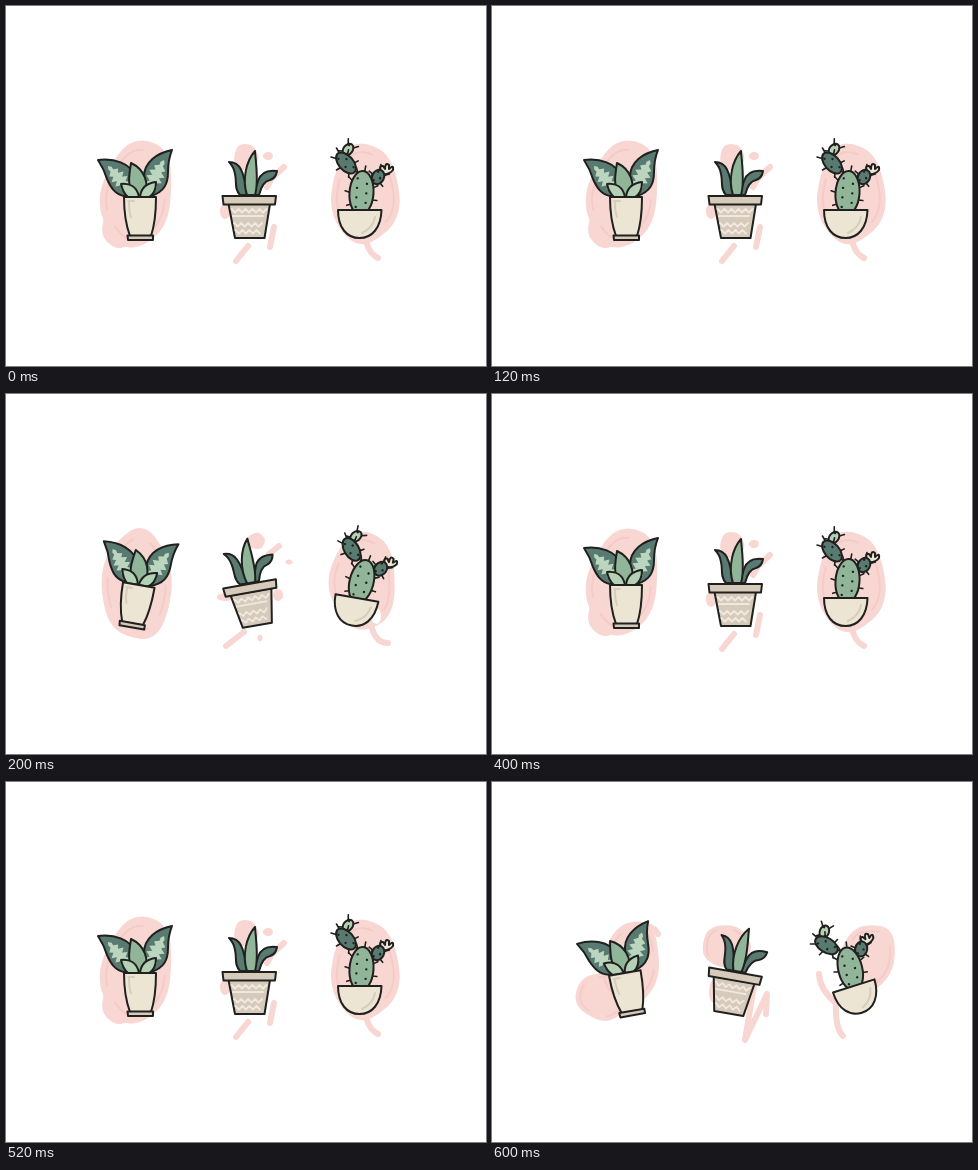
Animation, 480 px wide and 360 px high, one loop 800 ms. Source, as an HTML page:

```html
<!DOCTYPE html>
<html lang="en">
<head>
<meta charset="utf-8">
<title>Dancing plants</title>
<style>
html, body { margin: 0; width: 100%; height: 100%; overflow: hidden; background: #fff; }
svg { display: block; width: 100vw; height: 100vh; }
.wash { fill: #f8d6d2; }
.smear { fill: none; stroke: #f8d6d2; stroke-width: 6; stroke-linecap: round; stroke-linejoin: round; }
.streak { fill: none; stroke: #f5cbc7; stroke-width: 2; stroke-dasharray: 31 17; }
.gap { fill: #fff; }
.plant { stroke: #20201e; stroke-width: 2; stroke-linejoin: round; stroke-linecap: round; }
.dark { fill: #587a70; }
.mid { fill: #90b598; }
.light { fill: #b4d0b5; }
.cream { fill: #ece5d4; }
.clay { fill: #d6cbbb; }
.feather { fill: #bbd5be; stroke: none; }
.shade { fill: none; stroke: #d8cdba; }
.zig { fill: none; stroke: #f1e8df; stroke-width: 1.8; }
.spine { fill: none; stroke-width: 1.6; }
.dot { fill: #20201e; stroke: none; }
</style>
</head>
<body>
<svg id="stage" viewBox="0 0 480 360">
  <defs>
    <g class="plant" id="leafy">
      <path class="dark" d="M92 154C108 152 124 157 129 170L131 190H118C109 188 105 182 101 173Q98 163 92 154Z"/>
      <path class="dark" d="M166 144C151 147 138 156 138 171L137 190H145C158 186 162 178 162 166Q162 154 166 144Z"/>
      <g id="feathers"></g>
      <path class="mid" d="M125 157C138 163 145 178 137 191H128C121 181 123 169 125 157Z"/>
      <path class="light" d="M115 178C124 177 131 181 133 191H122Q117 187 115 178Z"/>
      <path class="light" d="M150 176C141 177 135 182 134 191H143Q150 187 150 176Z"/>
      <path class="cream" d="M118 191H150Q150 215 145 230H124Q118 214 118 191Z"/>
      <path class="shade" d="M122 195H128M123 196Q123 206 125 211"/>
      <path class="clay" d="M121.5 229.5H147V234H122Z"/>
    </g>

    <g class="plant" id="aloe">
      <path class="dark" d="M223 156C234 156 238 165 241 189H234C228 183 231 176 229 168Q228 161 223 156Z"/>
      <path class="dark" d="M271 165C263 164 255 165 252 175Q250 182 247 189H253C255 181 258 175 264 174Q270 172 271 165Z"/>
      <path class="mid" d="M249 145C240 155 236 174 241 189H249C253 176 250 159 249 145Z"/>
      <path class="clay" d="M222.5 198H264L258.5 232H229Z"/>
      <g id="zigs"></g>
      <path class="clay" d="M216.5 190H270L269 198.5H217.5Z"/>
    </g>

    <g class="plant" id="cactus">
      <path class="cream" d="M376 168Q372 159 377 160L379 163Q379 156 383 159V163Q388 158 387 164Q383 169 376 168Z"/>
      <g id="pads"></g>
      <path class="cream" d="M332 204H375.5C375 222 366 232 353.5 232S332 222 332 204Z"/>
      <path class="shade" d="M369 211Q367 222 356 227"/>
    </g>
  </defs>
</svg>

<script>
const $ = id => document.getElementById(id);
const NS = 'http://www.w3.org/2000/svg';
const LOOP = 800;
const ORDER = ['rest', 'tilt', 'rest', 'swing'];
const PIVOT = { leafy: [134, 191], aloe: [243, 190], cactus: [353.5, 204] };

// blots: x, y, rx, ry, lean; pose: sideways shift and angle
const SCENES = {
  rest: {
    blots: [[131, 188, 35, 54, 10], [114, 220, 18, 22], [240, 151, 12, 13], [262, 150, 5, 4],
      [219, 205, 5, 8], [359, 188, 34, 50]],
    smears: 'M278 161L266 172L261 181M230 255L242 240M264 241L268 221M361 238Q364 248 372 252',
    pose: { leafy: [0, 0], aloe: [0, 0], cactus: [0, 0] }
  },
  tilt: {
    blots: [[131, 191, 35, 55], [250, 147, 9, 8], [283, 168, 3.5, 2.5], [272, 201, 5, 6],
      [219, 203, 8, 4], [254, 244, 2.5, 3.5], [357, 187, 33, 49]],
    gap: [370, 222, 5, 8],
    smears: 'M263 160L273 152M220 252L238 238M366 234Q370 249 382 249',
    pose: { leafy: [-1.2, 10], aloe: [0.3, -10], cactus: [-2.8, 10] }
  },
  swing: {
    blots: [[138, 183, 29, 44, 12], [111, 214, 27, 24], [234, 164, 24, 21], [226, 209, 9, 14],
      [375, 177, 27, 36, 20]],
    smears: 'M155 144Q163 146 166 152M262 204L253 258L275 212L274 232M327 192Q328 208 344 221Q343 246 351 254',
    pose: { leafy: [-1.2, -10], aloe: [0.3, 10], cactus: [8, -17.5] }
  }
};

function add(parent, tag, attrs) {
  const el = document.createElementNS(NS, tag);
  for (const key in attrs) el.setAttribute(key, attrs[key]);
  return parent.appendChild(el);
}

// Ellipse with a wavering, brush-like edge
function blot([x, y, rx, ry, lean = 0], scale = 1) {
  const tilt = lean * Math.PI / 180;
  const points = [];
  for (let t = 0; t < Math.PI * 2; t += 0.08) {
    const r = scale * (1 + 0.025 * Math.sin(3 * t + x) + 0.02 * Math.sin(5 * t + y));
    const u = rx * r * Math.cos(t), v = ry * r * Math.sin(t);
    points.push([x + u * Math.cos(tilt) - v * Math.sin(tilt), y + u * Math.sin(tilt) + v * Math.cos(tilt)]
      .map(n => n.toFixed(1)));
  }
  return 'M' + points.join('L') + 'Z';
}

// Light leaf marking: a lens with jagged sides
function feather(x1, y1, x2, y2) {
  const steps = 12, dx = x2 - x1, dy = y2 - y1;
  const side = sign => Array.from({ length: steps + 1 }, (_, i) => {
    const t = i / steps;
    const w = sign * Math.sin(Math.PI * t) * (i % 2 ? 0.24 : 0.1);
    return [x1 + dx * t - dy * w, y1 + dy * t + dx * w];
  });
  add($('feathers'), 'path', { class: 'feather', d: 'M' + [...side(1), ...side(-1).reverse()].join('L') + 'Z' });
}

// Cactus segment with spines around it and staggered dots inside
function pad(fill, x, y, rx, ry, lean) {
  const g = add($('pads'), 'g', { transform: `translate(${x} ${y}) rotate(${lean})` });
  const spines = Math.round((rx + ry) / 3);
  let d = '';
  for (let i = 0; i < spines; i++) {
    const a = (i + 0.5) / spines * Math.PI * 2;
    const c = Math.cos(a), s = Math.sin(a);
    d += `M${rx * c} ${ry * s}l${4.5 * c} ${4.5 * s - 1}`;
  }
  add(g, 'path', { class: 'spine', d });
  add(g, 'ellipse', { class: fill, rx, ry });
  const dots = Math.round(ry / 3);
  for (let i = 0; i < dots; i++) {
    const cy = ry * 0.65 * (2 * i / (dots - 1) - 1);
    add(g, 'circle', { class: 'dot', cx: rx * (i % 2 ? 0.4 : -0.4), cy, r: 1.2 });
  }
}

feather(102, 160, 125, 186);
feather(158, 154, 141, 187);

pad('light', 342, 143.5, 4.6, 6.4, 38);
pad('dark', 340, 157, 7.3, 12.5, -41);
pad('dark', 372, 171, 6, 7.5, 28);
pad('mid', 355.5, 187, 12, 22, 4);

for (let row = 0; row < 4; row++) {
  const y = 203 + row * 7, inset = 3 + row * 1.3;
  let d = `M${222.5 + inset} ${y}`;
  for (let x = 226 + inset, i = 1; x < 264 - inset; x += 3.5, i++) {
    d += row === 1 ? 'l2.2 0m1.3 0' : `L${x} ${y + (i % 2) * 3.5}`;
  }
  add($('zigs'), 'path', { class: 'zig', d });
}

for (const [name, { blots, gap, smears, pose }] of Object.entries(SCENES)) {
  const g = add($('stage'), 'g', { visibility: 'hidden' });
  for (const b of blots) add(g, 'path', { class: 'wash', d: blot(b) });
  for (const b of blots.filter(b => b[2] > 20)) add(g, 'path', { class: 'streak', d: blot(b, 0.83) });
  add(g, 'path', { class: 'smear', d: smears });
  if (gap) add(g, 'path', { class: 'gap', d: blot(gap) });

  for (const [id, [shift, angle]] of Object.entries(pose)) {
    add(g, 'use', { href: '#' + id, transform: `translate(${shift} 0) rotate(${angle} ${PIVOT[id]})` });
  }

  const keys = [...ORDER, ORDER[ORDER.length - 1]].map((now, i) => ({
    visibility: now === name ? 'visible' : 'hidden',
    offset: i / ORDER.length,
    easing: 'step-end'
  }));
  g.animate(keys, { duration: LOOP, iterations: Infinity });
}
</script>
</body>
</html>
```
